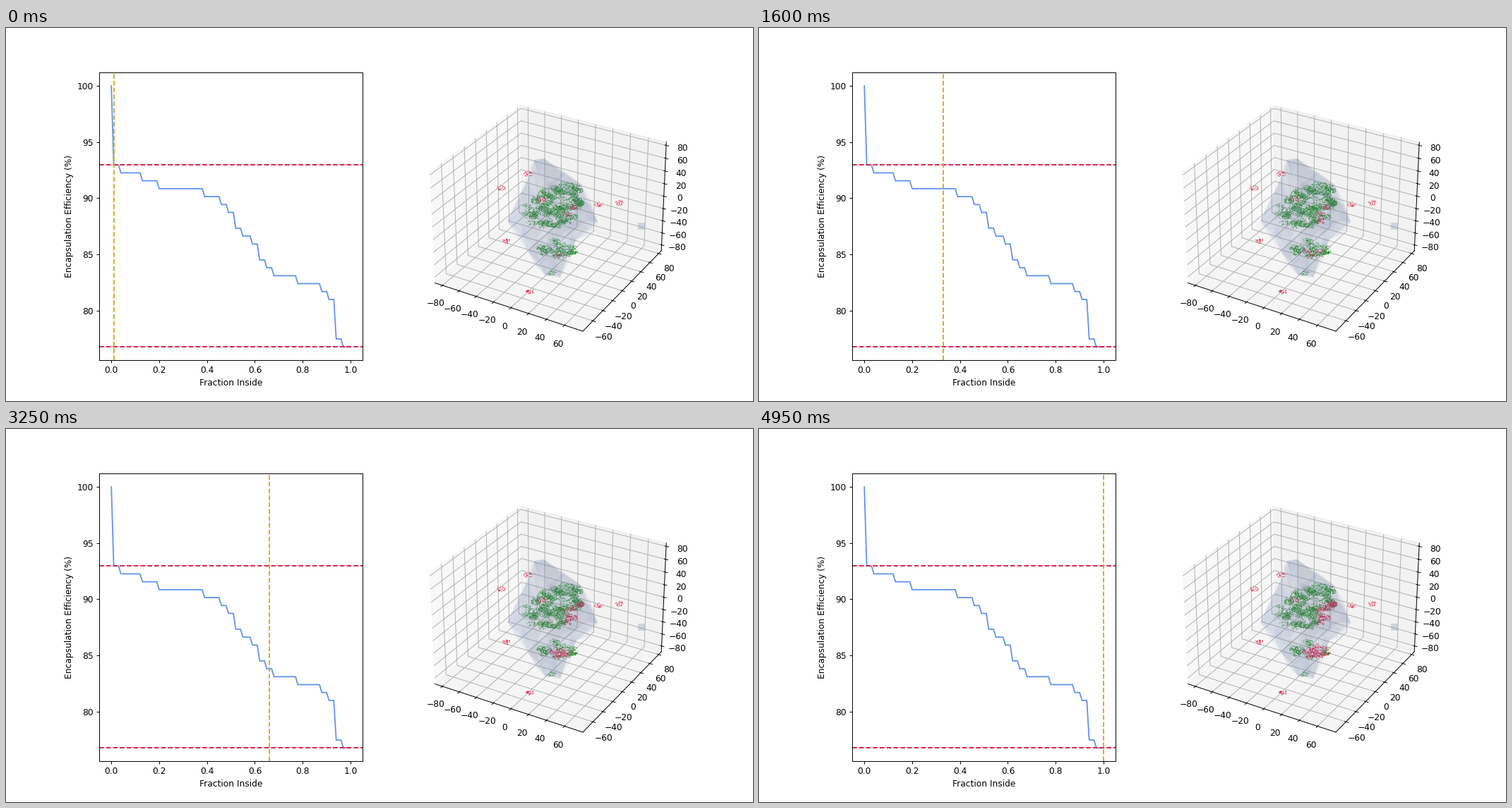
A matplotlib script for the animation above (5 s loop, 1058 by 529 pixels).

```python
import numpy as np
import matplotlib.pyplot as plt
from matplotlib.animation import FuncAnimation
from matplotlib.collections import PolyCollection
from matplotlib.colors import to_rgba

W, H = 1058, 529
DPI = W / 12
FRAMES, INTERVAL = 100, 50
TOTAL, DOTS = 142, 30

rng = np.random.default_rng(11)

# Percentages at which clusters stop counting as inside; most steps lose one.
STEPS = [1, 4, 13, 20, 39, *range(46, 56, 3), *range(59, 69, 3), 78, *range(88, 98, 3)]
LARGE_LOSSES = {1: 10, 52: 2, 62: 2, 94: 5}
LOSS_AT = np.repeat(STEPS, [LARGE_LOSSES.get(s, 1) for s in STEPS])

# Stage pixels
STRAYS = [(740, 207), (701, 227), (758, 243), (839, 250), (869, 248), (709, 302),
          (742, 374)]
EXPOSED_SPOTS = np.array([(814, 270), (787, 322)])
HULL_KEYS = np.array([(748, 187), (762, 185), (815, 222), (838, 275), (808, 300),
                      (785, 354), (764, 351), (740, 318), (710, 274), (737, 218)])
HULL_BLUE = (.42, .50, .68)


def disc(count, rx, ry):
    """Uniform random offsets inside an ellipse."""
    angle = rng.uniform(0, 2 * np.pi, count)
    radius = np.sqrt(rng.uniform(0, 1, count))
    return np.column_stack([rx * radius * np.cos(angle), ry * radius * np.sin(angle)])


def core_centres():
    upper = disc(108, 42, 31)
    upper[:, 1] -= .25 * upper[:, 0]
    lower = disc(26, 24, 12)
    tail = np.array([(773, 348)])
    return np.vstack([upper + (776, 252), lower + (781, 313), tail])


def by_exposure(centres):
    """Clusters near the thin spots of the hull come first."""
    gaps = np.linalg.norm(centres[:, None] - EXPOSED_SPOTS, axis=2) + (0, 8)
    return centres[np.argsort(gaps.min(1) + rng.normal(0, 7, len(centres)))]


def hull_facets():
    """One crumpled sheet of triangles filling the hull outline."""
    following = np.roll(HULL_KEYS, -1, axis=0)
    mids = (HULL_KEYS + following) / 2 + rng.normal(0, 3, HULL_KEYS.shape)
    middle = HULL_KEYS.mean(0)
    ring = middle + (HULL_KEYS - middle) * rng.uniform(.4, .8, (len(HULL_KEYS), 1))
    hub = middle + rng.normal(0, 10, 2)
    facets = []
    for a, m, b, p, q in zip(HULL_KEYS, mids, following, ring, np.roll(ring, -1, axis=0)):
        facets += [(a, m, p), (m, b, q), (m, p, q), (p, q, hub)]
    return facets


def add_hull(ax):
    for _ in range(3):
        facets = hull_facets()
        shade = rng.uniform(.7, 1.15, (len(facets), 1))
        alpha = rng.uniform(.05, .16, (len(facets), 1))
        colors = np.hstack([np.clip(HULL_BLUE * shade, 0, 1), alpha])
        ax.add_collection(PolyCollection(facets, facecolors=colors,
                                         edgecolors="none", zorder=3))
    ax.scatter(900, 281, s=67, marker="s", color=HULL_BLUE, alpha=.27, linewidths=0)


def add_dots(ax, points, color, zorder):
    dots = ax.scatter(*points.T, s=1, linewidths=0, zorder=zorder)
    return dots, np.tile(to_rgba(color), (len(points), 1))


fig = plt.figure(figsize=(12, 6), dpi=DPI)

# Efficiency curve
ax = fig.add_subplot(1, 2, 1)
percent = np.arange(101)
lost = np.searchsorted(LOSS_AT, percent, side="right")
efficiency = 100 * (1 - lost / TOTAL)
ax.plot(percent / 100, efficiency, color="cornflowerblue")
for level in efficiency[[1, -1]]:
    ax.axhline(level, color="crimson", linestyle="--")
marker = ax.axvline(.01, color="goldenrod", linestyle="--")
ax.set_xlim(-.05, 1.05)
ax.set_xlabel("Fraction Inside")
ax.set_ylabel("Encapsulation Efficiency (%)")

# Empty 3D box
box = fig.add_subplot(1, 2, 2, projection="3d")
box.set_xticks(range(-80, 61, 20))
box.set_yticks(range(-60, 81, 20))
box.set_zticks(range(-80, 81, 20))
box.set_xlim(-88.9, 79.9, view_margin=0)
box.set_ylim(-79.7, 86.3, view_margin=0)
box.set_zlim(-89.6, 84.9, view_margin=0)

# Box contents
stage = fig.add_axes([0, 0, 1, 1], facecolor="none")
stage.set(xlim=(0, W), ylim=(H, 0))
stage.axis("off")

centres = np.vstack([STRAYS, by_exposure(core_centres())])
cloud = np.vstack([c + disc(DOTS, 6.5, 3.8) for c in centres])
never = np.full(TOTAL - len(LOSS_AT), FRAMES + 1)
lost_at = np.repeat(np.concatenate([LOSS_AT, never]), DOTS)
alpha = np.repeat(rng.uniform(.5, .95, TOTAL), DOTS)

green, green_rgba = add_dots(stage, cloud, "forestgreen", 1)
red, red_rgba = add_dots(stage, cloud, "crimson", 2)
add_hull(stage)


def update(frame):
    step = frame + 1
    marker.set_xdata([step / 100] * 2)
    outside = lost_at <= step
    green_rgba[:, 3] = np.where(outside, 0, alpha)
    red_rgba[:, 3] = np.where(outside, alpha, 0)
    green.set_facecolors(green_rgba)
    red.set_facecolors(red_rgba)
    return marker, green, red


anim = FuncAnimation(fig, update, frames=FRAMES, interval=INTERVAL,
                     repeat=True, repeat_delay=0, blit=False)
plt.show()
```
